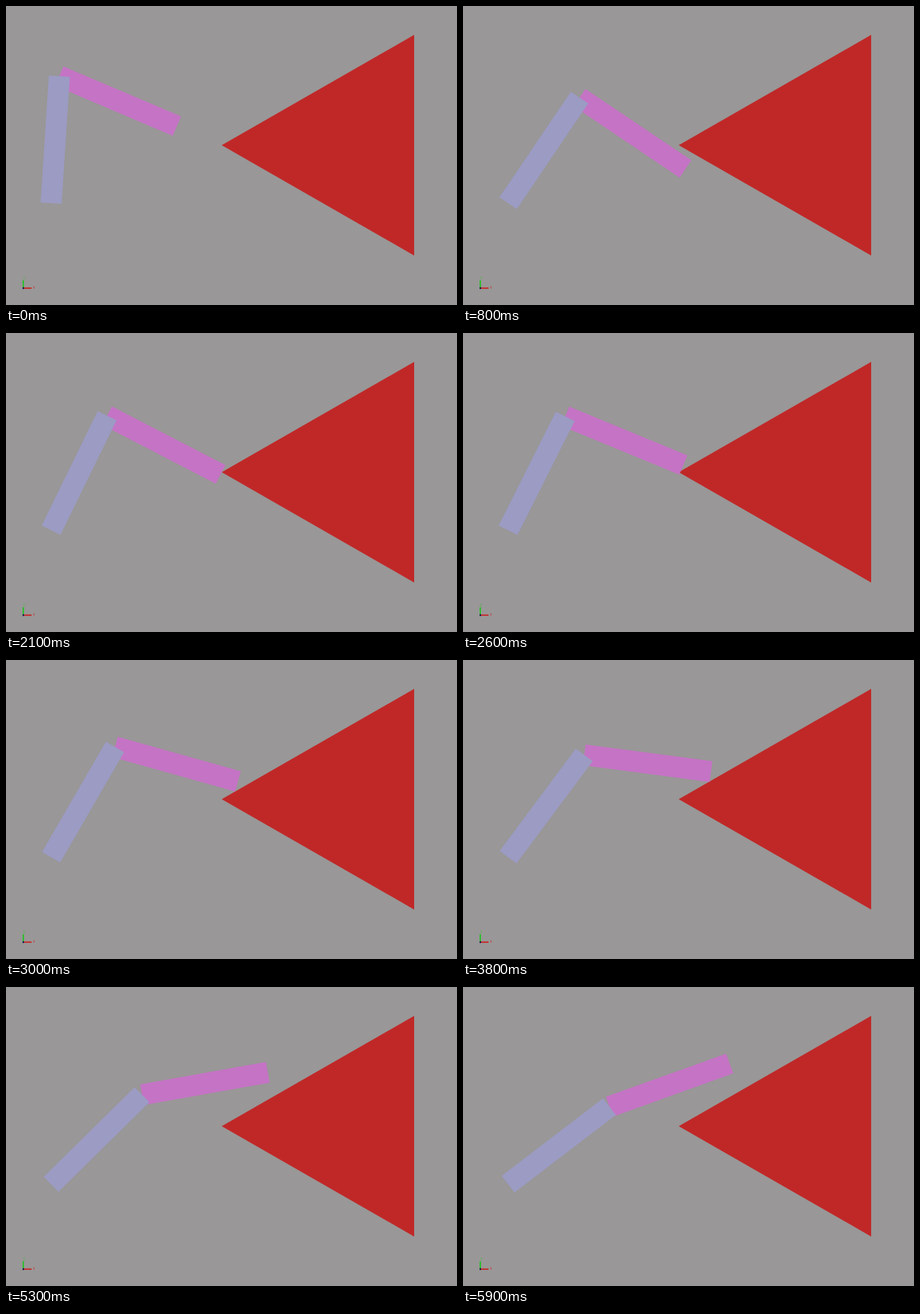
These frames come from a looping animation (600x399 px, 6 s). An HTML page without scripts:

```html
<!DOCTYPE html>
<html lang="en">
<head>
<meta charset="utf-8">
<title>Two-link arm</title>
<style>
  html, body { margin: 0; width: 100%; height: 100%; overflow: hidden; background: #999797; }
  svg { display: block; width: 100%; height: 100%; }
  text { font: 5px "Liberation Sans", sans-serif; }

  .shoulder, .elbow {
    transform-origin: 0 0;
    animation: 6s -10ms infinite;
  }
  .shoulder { animation-name: shoulder; }
  .elbow { animation-name: elbow; }

  /* Each step lasts 100 ms. */
  @keyframes shoulder {
    0%       { transform: rotate(3.7deg);  animation-timing-function: steps(7); }
    11.6667% { transform: rotate(33.5deg); animation-timing-function: steps(1); }
    13.3333% { transform: rotate(34deg);   animation-timing-function: steps(3); }
    18.3333% { transform: rotate(34.2deg); animation-timing-function: steps(3); }
    23.3333% { transform: rotate(31.2deg); animation-timing-function: steps(7); }
    35%      { transform: rotate(26deg);   animation-timing-function: steps(7); }
    46.6667% { transform: rotate(26.8deg); animation-timing-function: steps(2); }
    50%      { transform: rotate(30deg);   animation-timing-function: steps(5); }
    58.3333% { transform: rotate(34.1deg); animation-timing-function: steps(3); }
    63.3333% { transform: rotate(36.6deg); animation-timing-function: steps(8); }
    76.6667% { transform: rotate(39.9deg); animation-timing-function: steps(3); }
    81.6667% { transform: rotate(41.8deg); animation-timing-function: steps(7); }
    93.3333% { transform: rotate(48deg);   animation-timing-function: steps(3); }
    98.3333%, 100% { transform: rotate(52.5deg); }
  }
  @keyframes elbow {
    0%       { transform: rotate(19.4deg);  animation-timing-function: steps(7); }
    11.6667% { transform: rotate(-.5deg);   animation-timing-function: steps(1); }
    13.3333% { transform: rotate(0deg);     animation-timing-function: steps(3); }
    18.3333% { transform: rotate(-3.4deg);  animation-timing-function: steps(3); }
    23.3333% { transform: rotate(-2.2deg);  animation-timing-function: steps(7); }
    35%      { transform: rotate(1.4deg);   animation-timing-function: steps(7); }
    46.6667% { transform: rotate(-6.3deg);  animation-timing-function: steps(2); }
    50%      { transform: rotate(-14.3deg); animation-timing-function: steps(5); }
    58.3333% { transform: rotate(-23.4deg); animation-timing-function: steps(3); }
    63.3333% { transform: rotate(-29.1deg); animation-timing-function: steps(8); }
    76.6667% { transform: rotate(-41deg);   animation-timing-function: steps(3); }
    81.6667% { transform: rotate(-46.2deg); animation-timing-function: steps(7); }
    93.3333% { transform: rotate(-62.4deg); animation-timing-function: steps(3); }
    98.3333%, 100% { transform: rotate(-72.3deg); }
  }
</style>
</head>
<body>
<svg viewBox="0 0 600 399" preserveAspectRatio="none">
  <path d="M287 185.7 543 38.5V333Z" fill="#c02828"/>

  <g transform="translate(60 263.2)">
    <g class="shoulder">
      <g transform="translate(0 -170)">
        <rect class="elbow" y="-14" width="170" height="28" fill="#c573c5"/>
      </g>
      <rect x="-14" y="-170" width="28" height="170" fill="#9b9bc3"/>
    </g>
  </g>

  <g id="axes">
    <path d="M23 366V377" stroke="#10c810" stroke-width="1.5"/>
    <path d="M23 376.5H34" stroke="#d01010" stroke-width="1.5"/>
    <rect x="22" y="375.5" width="2" height="2" fill="#101050"/>
    <text x="23" y="364" fill="#48b848">y</text>
    <text x="36" y="377" fill="#c83030">x</text>
  </g>
</svg>
</body>
</html>
```
